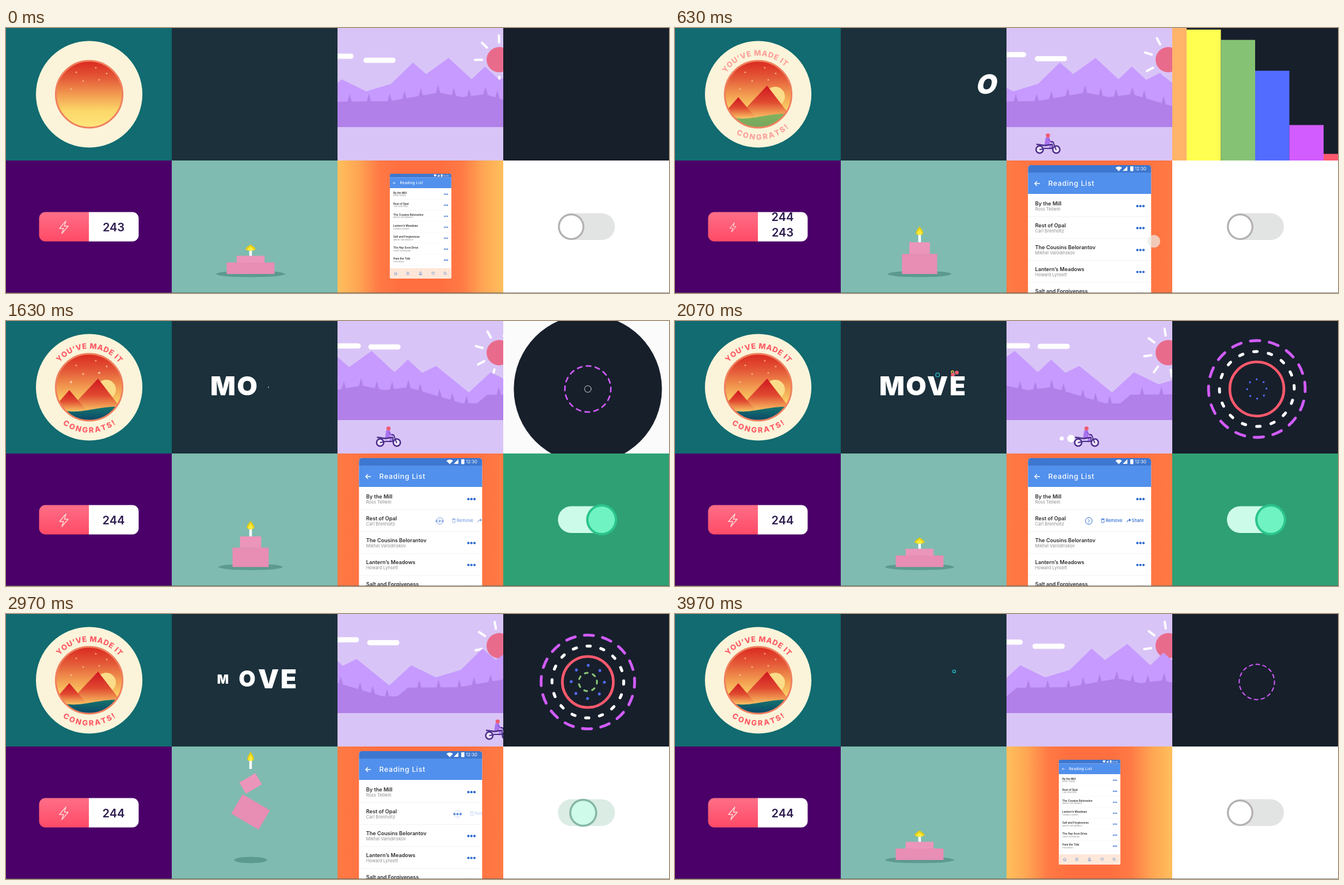
Recreate the animation shown at these times as an HTML page with a canvas. Size 1152 by 460 pixels, loop 4000 ms.

```html
<!DOCTYPE html>
<html lang="en">
<head>
<meta charset="utf-8">
<title>Eight small motion studies</title>
<style>
html, body { margin: 0; width: 100%; height: 100%; overflow: hidden; background: #fff; }
canvas { display: block; width: 1152px; height: 460px; }
</style>
</head>
<body>
<canvas id="stage" width="1152" height="460"></canvas>
<script>
const c = document.getElementById('stage').getContext('2d');
const LOOP = 4000, TAU = Math.PI * 2, RAD = Math.PI / 180;
const SANS = 'Inter, "Open Sans", sans-serif';

const linear = p => p;
const smooth = p => p * p * (3 - 2 * p);
const cubicOut = p => 1 - (1 - p) ** 3;
const cubicInOut = p => p < .5 ? 4 * p ** 3 : 1 - 4 * (1 - p) ** 3;
const clamp = p => Math.min(1, Math.max(0, p));

// Eased progress from 0 to 1 between two times.
const ramp = (t, from, to, ease = smooth) => ease(clamp((t - from) / (to - from)));
// Rises over the first span and falls over the second.
const pulse = (t, a, b, d, e) => ramp(t, a, b) - ramp(t, d, e);
const lerp = (a, b, p) => a + (b - a) * p;

// Value at t along flat pairs: time, value, time, value, ...
function keys(t, k, ease = smooth) {
  let value = k[1];
  for (let i = 2; i < k.length; i += 2) {
    if (t > k[i - 2]) value = lerp(k[i - 1], k[i + 1], ramp(t, k[i - 2], k[i], ease));
  }
  return value;
}
function seeded(seed) {
  return () => (seed = seed * 16807 % 2147483647) / 2147483647;
}
function mix(a, b, p) {
  const channel = (hex, i) => parseInt(hex.slice(i, i + 2), 16);
  return `rgb(${[1, 3, 5].map(i => Math.round(lerp(channel(a, i), channel(b, i), p)))})`;
}
function gradient(x0, y0, x1, y1, ...colors) {
  const g = c.createLinearGradient(x0, y0, x1, y1);
  colors.forEach((color, i) => g.addColorStop(i / (colors.length - 1), color));
  return g;
}
function rect(x, y, w, h, color) { c.fillStyle = color; c.fillRect(x, y, w, h); }
function pill(x, y, w, h, r, color) {
  c.beginPath(); c.roundRect(x, y, w, h, r); c.fillStyle = color; c.fill();
}
function disc(x, y, r, color) {
  c.beginPath(); c.arc(x, y, Math.max(0, r), 0, TAU); c.fillStyle = color; c.fill();
}
function ring(x, y, r, color, width) {
  c.beginPath(); c.arc(x, y, Math.max(0, r), 0, TAU);
  c.strokeStyle = color; c.lineWidth = width; c.stroke();
}
function trace(pts) {
  c.beginPath();
  for (let i = 0; i < pts.length; i += 2) c.lineTo(pts[i], pts[i + 1]);
}
function poly(pts, color) { trace(pts); c.fillStyle = color; c.fill(); }
function line(pts, color, width, close) {
  trace(pts); if (close) c.closePath();
  c.strokeStyle = color; c.lineWidth = width; c.stroke();
}
function text(s, x, y, size, weight, color, align = 'left', spacing = 0) {
  c.font = `${weight} ${size}px ${SANS}`;
  c.letterSpacing = spacing + 'px';
  c.textAlign = align; c.textBaseline = 'middle';
  c.fillStyle = color; c.fillText(s, x, y);
}
function group(draw) { c.save(); draw(); c.restore(); }
function fade(alpha, draw) {
  if (alpha > 0) group(() => { c.globalAlpha *= alpha; draw(); });
}
function around(x, y, scale, angle, draw) {
  group(() => { c.translate(x, y); c.rotate(angle); c.scale(scale, scale); draw(); });
}

// ---- badge ----
function arcText(s, radius, from, to) {
  c.font = `800 13px ${SANS}`; c.letterSpacing = '0px';
  const side = Math.sign(to - from);
  const widths = [...s].map(ch => c.measureText(ch).width);
  const sum = widths.reduce((a, b) => a + b);
  const gap = (Math.abs(to - from) * RAD * radius - sum) / (s.length - 1);
  let along = 0;
  [...s].forEach((ch, i) => {
    const a = from * RAD + side * (along + widths[i] / 2) / radius;
    around(radius * Math.cos(a), radius * Math.sin(a), 1, a + side * Math.PI / 2,
      () => text(ch, 0, 0, 13, 800, '#ff5c66', 'center'));
    along += widths[i] + gap;
  });
}
function star(x, y, r) {
  c.beginPath();
  for (let i = 0; i < 8; i++) {
    const d = i % 2 ? r * .3 : r;
    c.lineTo(x + d * Math.cos(i * TAU / 8), y + d * Math.sin(i * TAU / 8));
  }
  c.fillStyle = '#ffe3bd'; c.fill();
}
function mountain(x, top, left, right, rise) {
  const y = lerp(180, top, rise);
  poly([x, y, x + right, y + 70, x - left, y + 70], gradient(0, y, 0, y + 158 - top, '#cf1620', '#e04a30', '#fbcb68'));
}
function badge(t) {
  disc(144.5, 115, 92.5, '#fbf4da');
  group(() => {
    c.beginPath(); c.arc(144.5, 115, 57.5, 0, TAU); c.clip();
    rect(85, 56, 120, 120, gradient(0, 58, 0, 172, '#da2a20', '#e45a38', '#f29a50', '#fbd768', '#ffe67c'));
    [[122, 77], [156, 69], [175, 79], [134, 92], [162, 90], [113, 106]].forEach(([x, y], i) =>
      star(x, y, 2 + 2.6 * pulse(t, 850 + i * 50, 1150 + i * 30, 1200 + i * 30, 1600 + i * 70)));
    disc(174, lerp(195, 119, ramp(t, 80, 560)), 17, '#fbdc88');
    mountain(160, 100, 66, 54, ramp(t, 60, 420));
    mountain(110, 120, 62, 60, ramp(t, 140, 500));
    const y = 35 * (1 - ramp(t, 150, 530)), turn = ramp(t, 600, 1000);
    c.beginPath(); c.moveTo(84, 150 + y);
    c.bezierCurveTo(125, 168 + y, 150, 146 + y, 206, 149 + y);
    c.lineTo(206, 180 + y); c.lineTo(84, 180 + y);
    c.fillStyle = gradient(0, 148, 0, 173, mix('#84b35f', '#17766f', turn), mix('#78a95c', '#0b4768', turn));
    c.fill();
  });
  ring(144.5, 115, 58, '#f0805f', 3);
  fade(ramp(t, 380, 850), () =>
    around(144.5, 115, 1, -12 * RAD * (1 - ramp(t, 350, 950)), () => {
      arcText('YOU’VE MADE IT', 71, -140, -39);
      arcText('CONGRATS!', 75, 126, 54);
    }));
}

// ---- bouncing word ----
function burst(t, at, x, y, count) {
  const age = (t - at) / 300, rand = seeded(at * 7);
  if (Math.abs(age) > 1) return;
  for (let i = 0; i < count; i++) {
    const color = ['#29b6c6', '#ff5a6c', '#f5d43a'][i % 3];
    const px = x + (rand() - .5) * 46 + age * 8, py = y + (rand() - .5) * 22 + age * age * 12;
    const r = (2 + rand() * 1.8) * (1 - age * age);
    i % 3 === 1 ? disc(px, py, r, color) : ring(px, py, r, color, 1.4);
  }
}
function word(t) {
  [...'MOVE'].forEach((ch, i) => {
    const leave = 1 - ramp(t, 2850 + i * 60, 3080 + i * 60);
    const start = 1380 + i * 110;
    let x = [377, 419, 456, 491][i], y = 115, skew = 0, size = leave * ramp(t, start, start + 220);
    if (ch === 'O') {
      // Enters in two hops, then makes room for the other letters.
      const hop = ramp(t, 360, 1100, linear);
      x = lerp(605, 434, hop) - 15 * ramp(t, 1350, 1650);
      y -= 20 * Math.abs(Math.sin(hop * TAU));
      skew = -.22 * (1 - ramp(t, 630, 950));
      size = leave;
    }
    if (size > 0) around(x, y, size, 0, () => {
      c.transform(1, 0, skew, 1, 0, 0);
      text(ch, 0, 0, 46, 900, '#fff', 'center');
    });
  });
  burst(t, 1270, 472, 110, 2);
  burst(t, 2070, 474, 83, 5);
  burst(t, 3370, 412, 124, 4);
  burst(t, 3970, 498, 101, 1);
}

// ---- landscape ----
const PERIOD = 393;
const ridge = [6, 89, 49, 110, 92, 97, 130, 60, 153, 80, 192, 52, 232, 89, 255, 67, 280, 90, 304, 78, 361, 124];
const hill = [0, 128, 90, 127, 175, 112, 215, 120, 255, 115, 350, 143, 375, 143, 393, 128];
function bike(x) {
  const ink = '#4a2d8a';
  group(() => {
    c.translate(x, 0); c.lineCap = c.lineJoin = 'round';
    for (const side of [-14.5, 14.5]) { disc(side, 211, 6.5, '#efe6fc'); ring(side, 211, 6.2, ink, 2.5); }
    poly([-6, 203, -4, 190, 2, 189, 4, 196, 2, 204], '#a873ee');
    line([0, 202, 5, 203, 3, 209], '#a873ee', 3);
    line([1, 193, 5, 198, 9, 198], '#8d58d6', 2);
    disc(0, 186.5, 3.6, '#ef5b72');
    line([-19, 202, -5, 204, 7, 202], ink, 2.6);
    line([-14, 211, -5, 209, 7, 209, 8, 203], ink, 1.8);
    line([14, 211, 9, 198, 6, 197], ink, 2);
  });
}
function landscape(t) {
  const p = t / LOOP;
  const phase = .962 * p - .06 * Math.sin(Math.PI * Math.sqrt(p));
  const shift = phase * PERIOD, drift = Math.sin(Math.PI * p);
  disc(857, 55, 22, '#e96b8c');
  c.lineCap = 'round';
  for (let i = 0; i < 8; i++) around(857, 55, 1, (phase * 180 + i * 45) * RAD, () => line([30, 0, 42, 0], '#fff', 4));
  pill(540, 44.5 - 6 * drift, 64 + 13 * drift, 9, 4.5, '#fff');
  pill(621 + 9 * drift, 51.5 - 12 * drift ** 2, 56, 9, 4.5, '#fff');
  const layer = (profile, color) => {
    const pts = [-500, 172];
    for (let k = -1; k < 3; k++)
      for (let i = 0; i < profile.length; i += 2) pts.push(576 + profile[i] + k * PERIOD - shift, profile[i + 1]);
    poly([...pts, 1700, 172], color);
  };
  layer(ridge, '#c69aff');
  layer(hill, '#b180e9');
  const rand = seeded(41);
  for (let i = 0; i < 13; i++) {
    const at = 20 + i * 28 + rand() * 14, base = keys(at, hill, linear) + 3;
    for (const x of [576 + at - shift, 576 + at + PERIOD - shift])
      poly([x, base - 16, x + 4.5, base, x - 4.5, base], '#b180e9');
  }
  rect(576, 172, 288, 58, '#d9c4f7');
  const x = keys(t, [280, 545, 630, 648, 1270, 627, 2070, 715, 2670, 876, 3370, 821, 3800, 920]);
  const puff = pulse(t, 1850, 2070, 2080, 2300);
  disc(x - 27, 204, 6.5 * puff, '#fff');
  disc(x - 43, 204, 3.6 * puff, '#fff');
  bike(x);
}

// ---- colour bars, then rings ----
const PURPLE = '#d25cff', INDIGO = '#526cff', GREEN = '#86c274', RED = '#ff596d';
function bars(t) {
  ['#ffb469', '#ffff51', GREEN, INDIGO, PURPLE, RED].forEach((color, i) => {
    const h = 230 * ramp(t, 140 + 60 * i + 3 * i * i, 640 + 60 * i + 3 * i * i, cubicInOut);
    rect(829.5 + 59.5 * i, 230 - h, 59.5, h, color);
  });
}
const rings = [ // radius, growth start, growth time, dash count, dash share, width, color
  [17, 2200, 1100, 7, .36, 4.5, GREEN],
  [30, 1700, 1700, 8, .001, 5, INDIGO],
  [45, 1680, 400, 1, 1, 4.6, RED],
  [63, 1620, 350, 16, .24, 5, '#fff'],
  [82, 1560, 350, 16, .5, 4.8, PURPLE]
];
function shapes(t) {
  if (t < 1000) bars(t);
  else if (t < 1780) {
    rect(864, 0, 288, 230, '#fbfbfb');
    const half = lerp(250, 0, ramp(t, 1000, 1294, linear));
    group(() => {
      trace([864, 238.5 - half, 1152, -41 - half, 1152, -41 + half, 864, 238.5 + half]);
      c.clip(); bars(t);
    });
    disc(1011, 118, 190 * ramp(t, 1420, 1760), '#171f2b');
  }
  const breath = Math.cos((t - 2070) / 1300 * TAU);
  rings.forEach(([radius, start, time, count, share, width, color], i) => {
    const end = i < 4 ? 3640 + 60 * i : 4350;
    const r = (radius + 2 * breath) * ramp(t, start, start + time, cubicOut) * (1 - ramp(t, 3450, end));
    if (r < 1) return;
    around(1011, 118, 1, (-2.5 * breath - share * 180 / count) * RAD, () => {
      const step = TAU * r / count;
      c.lineCap = 'round';
      if (share < 1) c.setLineDash([step * share, step * (1 - share)]);
      ring(0, 0, r, color, Math.min(width, i < 4 ? r * .2 : r * .065));
    });
  });
}

// ---- counter button ----
function counter(t) {
  const s = t % 2100;
  group(() => {
    c.beginPath(); c.roundRect(57.5, 319.5, 173, 51, 11); c.clip();
    rect(57, 319, 87, 52, gradient(0, 319, 0, 371, '#ff6f88', '#ff4a66'));
    rect(144, 319, 87, 52, '#fff');
    const roll = keys(s, [460, 0, 570, -.15, 630, .34, 730, 1.07, 840, 1]);
    const number = (value, offset, alpha) =>
      fade(alpha, () => text(value, 187, 346.5 + 27 * offset, 20, 600, '#2d1b4e', 'center'));
    number(243, roll, 1 - ramp(roll, .4, .9));
    number(244, roll - 1, ramp(roll, 0, .2));
  });
  around(101, 346, 1 - .28 * pulse(s, 420, 570, 600, 820), 0, () => {
    c.lineJoin = 'round';
    line([3, -11, -8, 2, -1, 2, -4, 11, 7, -2, .5, -2], '#ffdcd6', 1.4, true);
  });
}

// ---- jumping cake ----
function cake(t) {
  const s = t % 2000, x = 425;
  const squash = keys(s, [420, 1, 690, 0, 1375, 0, 1480, .9, 1700, 0, 1970, 1], linear);
  const air = ramp(s, 690, 1375, linear);
  const lift = 4 * 66 * air * (1 - air), gap = 37 * Math.sin(Math.PI * air * air), spin = Math.PI * air * air;
  const w = 55 + 28 * squash, h = 39 - 19 * squash;
  c.beginPath(); c.ellipse(x, 427, 54 + 6 * squash - lift * .4, 5.5, 0, 0, TAU);
  c.fillStyle = '#5c9a90'; c.fill();
  let y = 427 - lift;
  const tier = (tw, th, angle, color) => {
    around(x, y - th / 2, 1, angle, () => rect(-tw / 2, -th / 2, tw, th, color));
    y -= th;
  };
  tier(w, h, spin, '#e88db4');
  y -= gap;
  tier(w * .585, h * .58, -spin, '#ec95ba');
  y -= gap * .75;
  tier(4.5, 5 + h * .25, 0, '#fff');
  const flame = (k, color) => {
    const fw = w * .1 * k, top = y - (4 + h * .28) * k;
    c.beginPath(); c.moveTo(x, top);
    c.bezierCurveTo(x + fw * .6, lerp(top, y, .35), x + fw * 2, y + 1, x, y + 1);
    c.bezierCurveTo(x - fw * 2, y + 1, x - fw * .6, lerp(top, y, .35), x, top);
    c.fillStyle = color; c.fill();
  };
  flame(1, '#e6cd14');
  flame(.65, '#f8ec3c');
}

// ---- reading list ----
const books = [
  ['By the Mill', 'Ross Tellwin'], ['Rest of Opal', 'Carl Brenholtz'],
  ['The Cousins Belorantov', 'Mikhel Varodinskov'], ['Lantern’s Meadows', 'Howard Lynsett'],
  ['Salt and Forgiveness', 'Mikhel Varodinskov'], ['The Hay Soon Dries', 'Albert Nordavale'], ['Hum the Tide', 'Paul Rindo']
];
const BLUE = '#2f6cd0';
const GLOW = ['#ffbf5c', '#ffa553', '#ff7a45', '#ff6f40'];
function dots(x, y) {
  for (const side of [-5.3, 0, 5.3]) disc(x + side, y, 2.1, BLUE);
}
function statusBar() {
  c.beginPath(); c.moveTo(771, 248.5); c.arc(771, 248.5, 8, -135 * RAD, -45 * RAD); c.fillStyle = '#fff'; c.fill();
  poly([778, 248, 786, 248, 786, 240], '#fff');
  pill(791, 240, 5.5, 8.5, 1, '#fff');
  text('12:30', 819, 245, 7.8, 400, '#fff', 'right');
}
function navIcons() {
  const icon = (x, draw) => around(x, 584, 1, 0, draw);
  c.lineJoin = 'round';
  icon(634, () => line([-5, 0, 0, -5, 5, 0, 3, 0, 3, 5, -3, 5, -3, 0], BLUE, 1.1, true));
  icon(676, () => { for (const y of [-4, 0, 4]) line([-5, y, 5, y], BLUE, 1.1); });
  icon(720, () => { ring(0, -3, 2.8, BLUE, 1.1); line([-5, 5, -4, 2, 4, 2, 5, 5], BLUE, 1.1, true); });
  icon(764, () => line([0, 5, -5, -1, -3, -5, 0, -3, 3, -5, 5, -1], BLUE, 1.1, true));
  icon(806, () => { ring(-1, -1, 3.8, BLUE, 1.1); line([2, 2, 5, 5], BLUE, 1.2); });
}
function rowActions(open) {
  around(809 - 90 * open, 347, 1, 0, () => {
    ring(0, 0, 5.8, BLUE, 1);
    line([-1.3, -2.7, 1.5, 0, -1.3, 2.7], BLUE, 1);
  });
  around(740 + 90 * (1 - open), 347, 1, 0, () => {
    c.strokeStyle = BLUE; c.lineWidth = .8; c.strokeRect(1.5, -2.5, 4, 5.5);
    line([.5, -3.5, 6.5, -3.5], BLUE, .9);
    text('Remove', 8.3, 0, 7.6, 500, BLUE);
    line([45, 2.5, 46.5, -1, 51, -1.5], BLUE, 1);
    poly([49, -4.2, 52.3, -1.5, 49, 1.2], BLUE);
    text('Share', 53.5, 0, 7.6, 500, BLUE);
  });
}
function phone(t) {
  const zoom = .5 + .5 * pulse(t, 80, 520, 3290, 3740);
  const open = pulse(t, 1400, 1800, 2760, 3080);
  around(720.3, 268, zoom, 0, () => {
    c.translate(-720.3, -268);
    rect(430, 100, 580, 600, gradient(432, 0, 1008, 0, ...GLOW, '#ff6f40', ...[...GLOW].reverse()));
    c.beginPath(); c.roundRect(613.3, 238, 214, 364, 5); c.clip();
    rect(613, 238, 215, 364, '#fff');
    rect(613, 238, 215, 13, '#3e77cf');
    rect(613, 251, 215, 37, '#5190ec');
    statusBar();
    line([634, 270, 625, 270], '#fff', 1.4);
    line([629, 266, 625, 270, 629, 274], '#fff', 1.4);
    text('Reading List', 648.5, 270, 12.3, 500, '#fff', 'left', .7);
    books.forEach(([title, author], i) => {
      const y = 305 + i * 38.1, slide = i === 1 ? open : 0;
      text(title, 625.8, y, 9.1, 600, '#2c2c2c');
      text(author, 625.8, y + 9.5, 7.5, 400, '#8e8e8e');
      rect(613, y + 22, 215, .8, '#f0f0f0');
      fade(1 - slide, () => dots(808.7 - 90 * slide, y + 4.2));
    });
    fade(open, () => rowActions(open));
    rect(613, 566, 215, 36, '#fde7d9');
    navIcons();
  });
  fade(pulse(t, 450, 600, 1350, 1500), () => {
    const near = ramp(t, 500, 950);
    disc(lerp(838, 809, near), lerp(376, 348, near), 11, 'rgba(236,234,230,.72)');
    if (near === 1) fade(1 - open, () => dots(808.7, 347.3));
  });
  fade(pulse(t, 2450, 2600, 2780, 2980), () => disc(720, 347, 14, 'rgba(236,236,238,.92)'));
}

// ---- toggle ----
function toggle(t) {
  const on = pulse(t, 970, 1500, 2800, 3080);
  const pale = 1 - pulse(t, 1130, 1500, 2580, 2950);
  if (t < 2950) disc(1008, 345, keys(t, [1130, 0, 1270, 31, 1620, 200], linear), mix('#2ea074', '#ffffff', pale * .6 + pale ** 3 * .4));
  pill(959, 321.5, 99, 46.5, 23.2, mix('#e2e4e3', '#cdfbe9', on));
  const x = lerp(982, 1035, pulse(t, 950, 1250, 2800, 3100));
  disc(x, 345, 23 + 4 * pulse(t, 1270, 1550, 2800, 3080), mix('#b4b0b4', '#2bc48b', on));
  disc(x, 345, 19.7 + 3.2 * on, mix('#ffffff', '#70f3c2', on));
}

const tiles = [
  ['#116b70', badge], ['#1b303b', word], ['#d9c4f7', landscape], ['#171f2b', shapes],
  ['#4a0068', counter], ['#7fbbb0', cake], ['#ff6f40', phone], ['#ffffff', toggle]
];
function frame(now) {
  const t = now % LOOP;
  tiles.forEach(([color, draw], i) => group(() => {
    const x = i % 4 * 288, y = (i >> 2) * 230;
    c.beginPath(); c.rect(x, y, 288, 230); c.clip();
    rect(x, y, 288, 230, color);
    draw(t);
  }));
  rect(0, 459, 1152, 1, 'rgba(90,90,90,.7)');
  requestAnimationFrame(frame);
}
requestAnimationFrame(frame);
</script>
</body>
</html>
```
